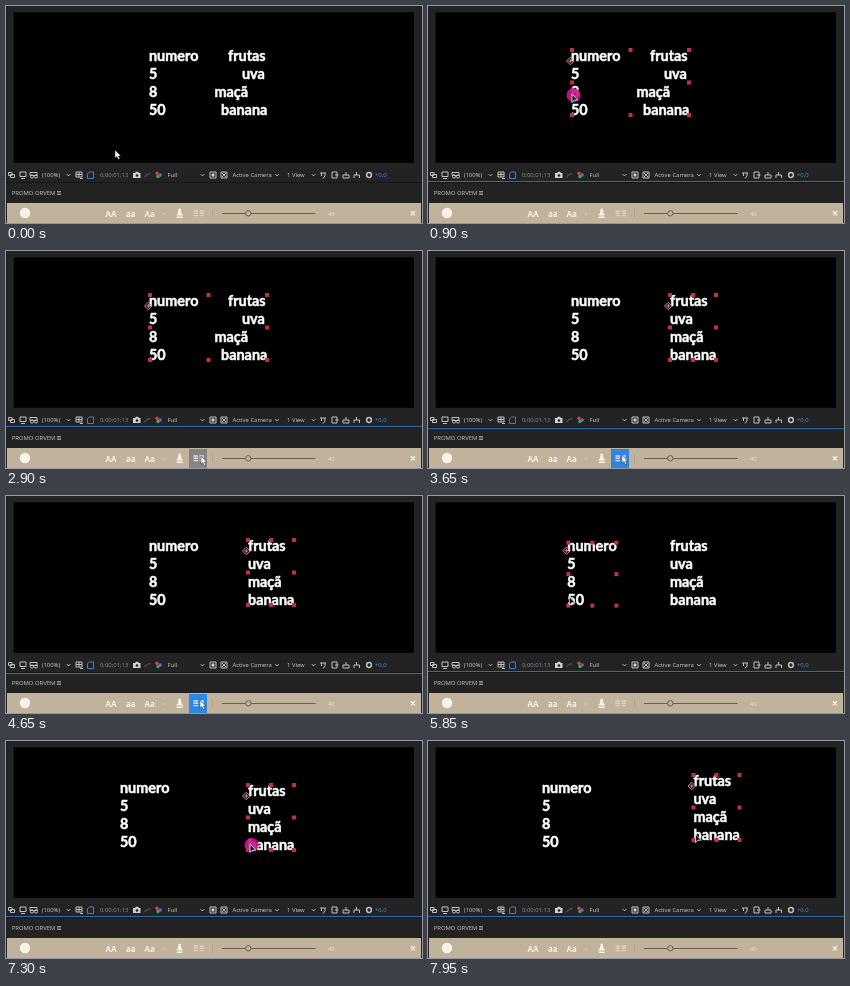
Recreate the animation shown at these times as an HTML page. Size 416 by 217 pixels, loop 8000 ms.

```html
<!DOCTYPE html>
<html lang="pt">
<head>
<meta charset="utf-8">
<title>Alinhamento de texto</title>
<style>
html, body { margin: 0; width: 100%; height: 100%; overflow: hidden; background: #232323; }
svg { display: block; width: 100%; height: 100%; }
.ui { font: 5.9px "Open Sans", "Noto Sans", sans-serif; fill: #cacaca; }
.word { font: 700 14.4px Lato, "Open Sans", sans-serif; fill: #fff; stroke: #fff; stroke-width: .5; }
.case { font: 700 8px "Open Sans", "Noto Sans", sans-serif; fill: #f6f3ee; }
.line { fill: none; stroke: #c0c0c0; stroke-width: 1; }
</style>
</head>
<body>
<svg viewBox="0 0 416 217" xmlns="http://www.w3.org/2000/svg">
  <rect width="416" height="217" fill="#232323"/>
  <rect x="7.700" y="6.300" width="400.300" height="150.500" fill="#000"/>
  <rect y="176" width="416" height="1" fill="#161616"/>

  <g class="line">
    <path d="M2.500 166.500h3.500v3h-3.500zM4.500 168.500h4v3h-4zM14 166h6v4.500h-6zM15 172.500h4"/>
    <path d="M24 166.500h7v3h-7z"/>
    <circle cx="26" cy="170.500" r="1.600"/><circle cx="30" cy="170.500" r="1.600"/>
    <path d="M70 166h6v5h-6zM73 166v5M70 168.500h6M74 172.500h3"/>
    <path d="M81.500 172.500v-5l2-1.500h4v6.500z" stroke="#2f86d6"/>
    <path d="M204 166h6v6h-6zM215 166h6v6h-6zM216 167l4 4M220 167l-4 4"/>
    <path d="M314 167h6M315.500 167v3M319 167v3l-2 2.500M326 166h5v6h-5zM329 169h3.500"/>
    <path d="M337 172v-3h6v3zM340 169v-3M350.500 166v3M348 172v-3h5.500v3"/>
    <circle cx="363" cy="169" r="2.400" stroke-width="1.500"/>
  </g>
  <g fill="#d0d0d0">
    <path d="M127 167h2l1-1.300h2l1 1.300h1.500v5H127z"/>
    <circle cx="131" cy="169.500" r="1.300" fill="#232323"/>
    <rect x="205.500" y="167.500" width="3" height="3"/>
    <path d="M138.500 171q3-4 6-3" fill="none" stroke="#4a4a4a" stroke-width="1.500"/>
  </g>
  <circle cx="151" cy="167.300" r="1.700" fill="#d6453c"/>
  <circle cx="152" cy="170.500" r="1.700" fill="#3fae50"/>
  <circle cx="154.200" cy="169" r="1.700" fill="#4a72d8"/>
  <g class="ui">
    <text x="35.700" y="171">(100%)</text>
    <text x="94" y="171" fill="#8492a0">0;00;01;13</text>
    <text x="161.500" y="171">Full</text>
    <text x="226.500" y="171">Active Camera</text>
    <text x="281" y="171">1 View</text>
    <text x="369" y="171" fill="#3d94e6">+0,0</text>
    <text x="5.700" y="189.300">PROMO ORVEM</text>
  </g>
  <g class="line" id="chevrons"></g>
  <path class="line" d="M51 185.500h4M51 187h4M51 188.500h4" style="stroke-width:.7"/>

  <rect x="1" y="197" width="414" height="20" fill="#c0b29b"/>
  <circle cx="19" cy="207" r="5.200" fill="#f6f3ee"/>
  <g class="case">
    <text x="99.500" y="210.500">AA</text>
    <text x="120" y="210.500">aa</text>
    <text x="138.500" y="210.500">Aa</text>
  </g>
  <circle cx="158" cy="208" r=".7" fill="#ddd4c6"/>
  <path d="M173.700 202.500a1.300 1.300 0 0 1 1.200 2l.9 3.500h.9v1.500h-6v-1.500h.9l.9-3.500a1.300 1.300 0 0 1 1.200-2zM170.700 210.500h6v1.500h-6z" fill="#f6f3ee"/>
  <path d="M206.500 203v9" stroke="#aea28d" stroke-width=".8"/>
  <rect id="button" x="183" y="198" width="18" height="19"/>
  <path id="columns" d="M187.500 205h4.500M193.500 205h4.500M187.500 207.300h4.500M193.500 207.300h4.500M187.500 209.600h4.500M193.500 209.600h4.500" stroke="#f6f3ee" stroke-width="1.400"/>
  <path d="M216 207.500h93.500" stroke="#665f55"/>
  <circle cx="242.300" cy="207.300" r="2.700" fill="#c0b29b" stroke="#665f55"/>
  <text x="322" y="209.500" class="ui" style="fill:#e9e3d9">40</text>
  <path d="M404.800 205.200l4.200 4.200M409 205.200l-4.200 4.200" stroke="#fff" stroke-width="1.100"/>

  <path id="viewFocus" d="M0 175.500h416" stroke="#2a6eb0"/>
  <path id="toolFocus" d="M0 177.500h416" stroke="#2a6eb0"/>

  <g id="layers"></g>
  <circle id="press" r="7" fill="#d3148f" fill-opacity=".9"/>
  <g id="cursor">
    <path id="arrow" d="M0 0v8.200l1.900-1.700 1.400 3 1.500-.7-1.400-2.900h2.600z" fill="#fff" stroke="#222" stroke-width=".5"/>
    <path id="head" d="M0 0v8.600l2.200-2.400h3.600z" fill="#111" stroke="#eee" stroke-width=".8"/>
  </g>
</svg>
<script>
const NS = 'http://www.w3.org/2000/svg';
const LOOP = 8000, STEP = 50;
const $ = id => document.getElementById(id);

function add(parent, tag, attrs, text) {
  const el = document.createElementNS(NS, tag);
  for (const k in attrs) el.setAttribute(k, attrs[k]);
  if (text) el.textContent = text;
  parent.appendChild(el);
  return el;
}

for (const x of [62.5, 196.5, 271, 307.5])
  add($('chevrons'), 'path', { d: `M${x - 1.7} 168.200l1.700 1.700 1.700-1.700` });

// A text layer: lines of words plus its hover outline and selection handles.
function makeLayer(words, [l, t, r, b]) {
  const root = add($('layers'), 'g', {});
  for (const [text, x, row] of words)
    add(root, 'text', { class: 'word', x, y: 55 + row * 18 }, text);
  const hover = add(root, 'rect', {
    x: l, y: t, width: r - l, height: b - t, fill: 'none', stroke: '#a8324a', 'stroke-width': .8
  });
  const marks = add(root, 'g', { fill: '#bd3049' });
  const mx = (l + r) / 2, my = (t + b) / 2;
  for (const x of [l, mx, r])
    for (const y of [t, my, b])
      if (x !== mx || y !== my) add(marks, 'rect', { x: x - 2, y: y - 2, width: 4, height: 4 });
  const ax = l - 1.7;
  add(marks, 'path', {
    d: `M${ax - 3.8} 55l3.800-3.800 3.800 3.800-3.800 3.800zM${ax - 2} 55h4M${ax} 53v4`,
    fill: 'none', stroke: '#d98a98'
  });
  return { root, hover, marks };
}

const numbers = ['numero', '5', '8', '50'].map((s, i) => [s, 143, i]);
const fruit = ['frutas', 'uva', 'maçã', 'banana'];
const ragged = [222, 236, 208.5, 215];
const table = makeLayer([...numbers, ...fruit.map((s, i) => [s, ragged[i], i])], [144, 44, 261, 109]);
const left = makeLayer(numbers, [144, 47, 192, 110]);
const right = makeLayer(fruit.map((s, i) => [s, 242, i]), [242, 44, 288, 109]);

const smooth = p => p * p * (3 - 2 * p);
const easeIn = p => p * p;
const easeOut = p => p * (2 - p);

// time, x, y, easing towards this point
const path = [
  [0, 109, 144], [300, 144, 88, smooth], [1600, 144, 88],
  [1950, 150, 127, easeIn], [2400, 197, 188, easeOut],
  [2450, 197, 188], [2900, 195, 205, smooth], [3400, 195, 205],
  [3600, 194, 204], [4650, 194, 204], [5250, 145, 101, smooth],
  [5750, 145, 101], [6200, 116, 98, smooth], [6400, 150, 113, smooth],
  [6450, 150, 113], [7050, 244, 103, smooth], [7300, 244, 103],
  [7950, 267.5, 93, smooth], [8000, 267.5, 93]
];

function cursorAt(t) {
  const i = Math.max(1, path.findIndex(k => k[0] >= t));
  const [t0, x0, y0] = path[i - 1], [t1, x1, y1, ease = p => p] = path[i];
  const p = ease((t - t0) / (t1 - t0));
  return [x0 + (x1 - x0) * p, y0 + (y1 - y0) * p];
}

function dragged(t, from, to) {
  const a = cursorAt(from), b = cursorAt(Math.min(Math.max(t, from), to));
  return [b[0] - a[0], b[1] - a[1]];
}

const show = (el, on) => el.setAttribute('visibility', on ? 'inherit' : 'hidden');
const move = (el, [x, y]) => el.setAttribute('transform', `translate(${x.toFixed(2)} ${y.toFixed(2)})`);

function setLayer(layer, visible, hover, selected) {
  show(layer.root, visible);
  show(layer.hover, hover);
  show(layer.marks, selected);
}

const clicks = [800, 3400, 5600, 7200];

function draw(t) {
  const within = (a, b) => t >= a && t < b;
  const split = t >= 3650;

  setLayer(table, !split, within(250, 900), within(900, 3650));
  setLayer(left, split, within(5150, 5650), within(5650, 7200));
  setLayer(right, split, within(6950, 7200), within(3650, 5650) || t >= 7200);
  move(left.root, dragged(t, 5600, 6200));
  move(right.root, dragged(t, 7200, 8000));

  const hot = within(2700, 4750);
  show($('button'), hot);
  $('button').setAttribute('fill', t < 3450 ? '#868583' : '#2d87e2');
  $('columns').setAttribute('opacity', hot ? .85 : .5);
  show($('viewFocus'), within(850, 3450) || t >= 5650);
  show($('toolFocus'), within(3450, 5650));

  const at = cursorAt(t);
  const overText = within(250, 1700) || within(5150, 6250) || t >= 6950;
  move($('cursor'), at);
  show($('head'), overText);
  show($('arrow'), !overText);
  move($('press'), [at[0] + 1.5, at[1] + 1]);
  show($('press'), clicks.some(c => within(c, c + 200)));
}

const start = performance.now();
function tick() {
  const t = (performance.now() - start) % LOOP;
  draw(Math.floor(t / STEP) * STEP);
  requestAnimationFrame(tick);
}
tick();
</script>
</body>
</html>
```
